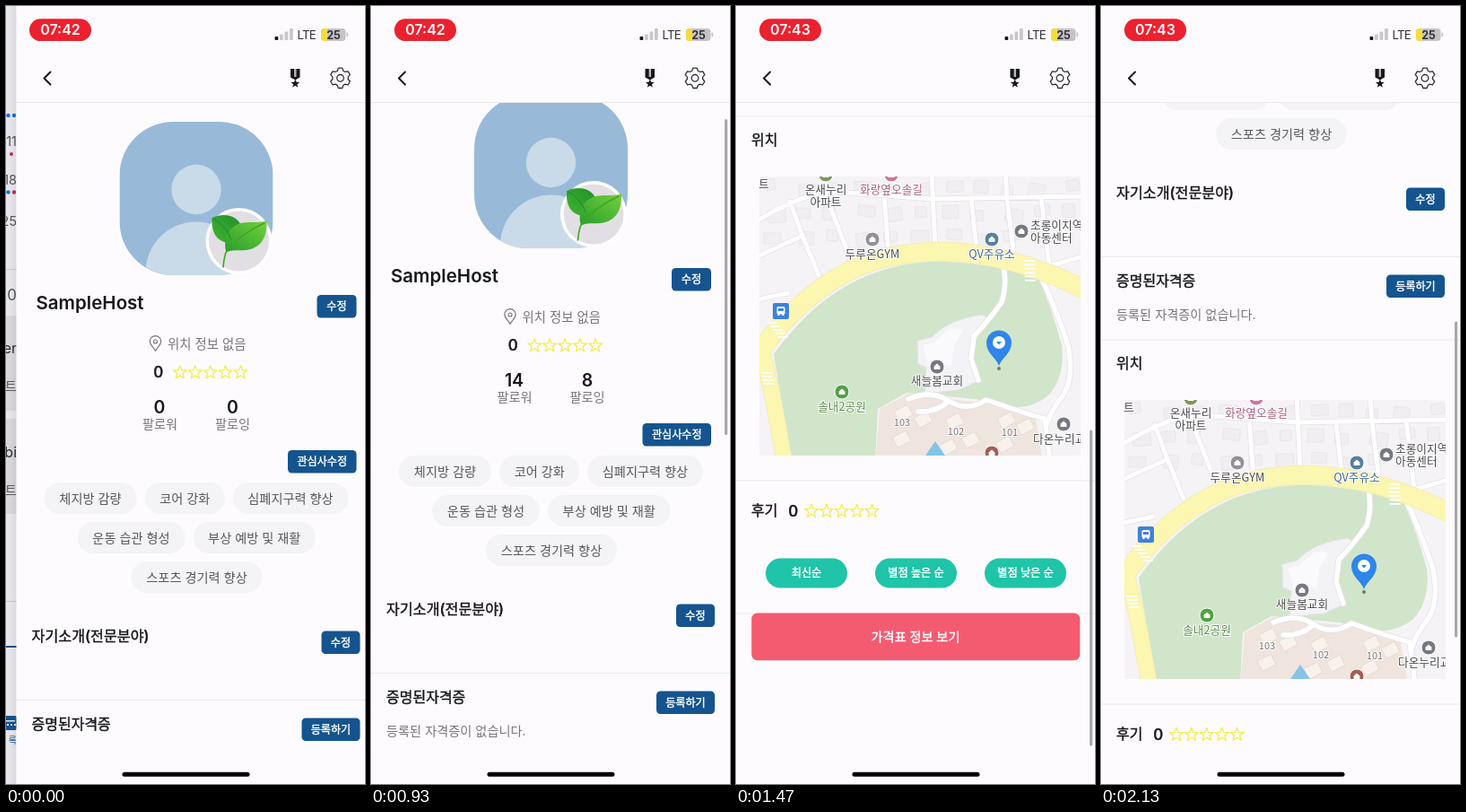
Animation, 400 px wide and 867 px high, one loop 2200 ms. Source, as an HTML page:

```html
<!DOCTYPE html>
<html lang="ko">
<head>
<meta charset="utf-8">
<title>Profile</title>
<style>
html, body { margin: 0; width: 100%; height: 100%; overflow: hidden; background: #fdfbfe; }
svg { display: block; width: 400px; height: 867px; font-family: Inter, "Noto Sans CJK KR", "Noto Sans CJK", sans-serif; }
.map text { font-family: "Noto Sans CJK KR", "Noto Sans CJK", sans-serif; paint-order: stroke; stroke: #fff; stroke-width: 2px; stroke-linejoin: round; }
</style>
</head>
<body>
<svg id="stage" viewBox="0 0 400 867"></svg>
<script>
const STEP = 1000 / 15, FRAMES = 33;
const INK = '#17171a', GRAY = '#77757b', NAVY = '#15548e';

const rect = (x, y, w, h, r, fill, more = '') =>
  `<rect x="${x}" y="${y}" width="${w}" height="${h}" rx="${r}" fill="${fill}" ${more}/>`;
const circle = (x, y, r, fill, more = '') => `<circle cx="${x}" cy="${y}" r="${r}" fill="${fill}" ${more}/>`;
const path = (d, fill, stroke = 'none', w = 1, more = '') =>
  `<path d="${d}" fill="${fill}" stroke="${stroke}" stroke-width="${w}" stroke-linecap="round" stroke-linejoin="round" ${more}/>`;
// Medium weight gets a hairline stroke, as the Korean face has only regular and bold.
const text = (s, x, y, size, fill = INK, weight = 400, anchor = 'start', more = '') =>
  `<text x="${x}" y="${y}" font-size="${size}" fill="${fill}" font-weight="${weight}" text-anchor="${anchor}" ${weight === 500 ? `stroke="${fill}" stroke-width=".4"` : ''} ${more}>${s}</text>`;
const mid = (s, x, y, size, fill, weight, more) => text(s, x, y, size, fill, weight, 'middle', more);
const line = (y, color = '#ebe9ed') => rect(0, y - .5, 400, 1, 0, color);

const polar = (cx, cy, pts) => 'M' + pts.map(([r, deg]) => {
  const a = deg * Math.PI / 180;
  return (cx + r * Math.cos(a)).toFixed(2) + ' ' + (cy + r * Math.sin(a)).toFixed(2);
}).join('L') + 'Z';
const starPath = (x, y, r) =>
  polar(x, y, Array.from({ length: 10 }, (_, i) => [i % 2 ? r * .42 : r, i * 36 - 90]));
const stars = (x, y) => [0, 1, 2, 3, 4]
  .map(i => path(starPath(x + i * 16.9, y, 7.8), 'none', '#f2ec45', 1.2)).join('');

const button = (s, x, y, w) => rect(x, y, w, 25.5, 4.5, NAVY) + mid(s, x + w / 2, y + 17.2, 12.1, '#fff', 500);
const tag = (s, x, y, w) => rect(x, y, w, 35, 17.5, '#f4f3f5') + mid(s, x + w / 2, y + 22.5, 14.2, '#59575c');
const pill = (s, x) => rect(x, 1358.6, 91, 33, 16.5, '#1fc4a9') + mid(s, x + 45.5, 1379.3, 12.2, '#fff', 500);

function statusBar() {
  const bars = [4, 6.5, 9.5, 13].map((h, i) =>
    rect(299.5 + i * 5.5, 38 - h, 3.8, h, 1, i ? '#c9c7cb' : INK)).join('');
  return rect(26, 14.3, 69, 24.8, 12.4, '#eb212f')
    + mid('07:42', 60.5, 32.4, 16, '#fff', 600, 'id="clock"') + bars
    + text('LTE', 324.5, 37, 13.2, '#333', 400, 'start', 'letter-spacing="-.7"')
    + rect(351, 25, 27.5, 14, 4, '#c5c3c7') + path('M358 25h-3a4 4 0 0 0-4 4v6a4 4 0 0 0 4 4h3z', '#f6dc3b')
    + rect(379.5, 29.5, 1.6, 5, .8, '#c5c3c7') + mid('25', 365, 36.6, 12.5, '#333', 700);
}

function header() {
  const teeth = [];
  for (let a = -90; a < 270; a += 60) teeth.push([8.7, a - 22], [11.4, a - 11], [11.4, a + 11], [8.7, a + 22]);
  return path('M38 73.5l-7 7 7 7', 'none', INK, 2)
    + path('M305.5 70h10.5v9.5l-5.2 3-5.3-3z', INK) + rect(309.6, 70, 2.4, 9, 0, '#b9b7bb')
    + path(starPath(310.8, 86.6, 5.2), INK)
    + path(polar(361, 80.3, teeth), 'none', '#303034', 1.3) + circle(361, 80.3, 3.8, 'none', 'stroke="#303034" stroke-width="1.3"')
    + line(107.5);
}

function avatar() {
  return `<g clip-path="url(#face)">${rect(115, 129, 171, 171, 0, '#98bad8')}${circle(200.5, 204.5, 27.7, '#c9dbe8')}${circle(200.5, 297, 56.5, '#c9dbe8')}</g>`
    + circle(248, 262, 37, '#fff') + circle(248, 262, 33.5, '#e2dfe4')
    + path('M218 236C229 231 243 232 249 242C253 252 247 262 236 264C222 262 217 251 218 236Z', 'url(#leafA)')
    + path('M279 239C280 257 273 270 256 272C247 273 239 271 234 275C230 262 235 248 247 243C258 239 270 243 279 239Z', 'url(#leafB)')
    + path('M276 242C261 249 239 263 233 276Q231 284 230.5 291', 'none', '#3fa52b', 1.6)
    + path('M220 237Q235 246 239 260', 'none', '#1b8a2c', 1);
}

function townMap() {
  const main = 'M20 368C48 322 93 278 150 257C220 236 300 243 392 290';
  const side = 'M30 362C40 395 46 437 54 480';
  const lanes = 'M20 214Q52 192 98 178L218 187L390 184M98 178L128 255M218 155L222 243M300 155L302 187L309 244M26 250L74 228L60 190M74 228L92 272M165 183L170 248M262 186L268 243M340 185L349 262M20 300L58 292M390 250L349 262';
  const yard = 'M298 262Q302 283 296 302Q282 322 265 340L262 365L270 389M338 270Q356 307 370 350Q377 385 365 405Q350 424 347 437M192 410Q218 399 237 412Q257 425 279 411Q319 425 344 432L350 480M237 412Q224 425 203 424';
  const street = (d, w) => path(d, 'none', '#e3e0e4', w + 1.4) + path(d, 'none', '#fff', w);
  let houses = '';
  for (let i = 0; i < 32; i++) {
    const x = 30 + (i % 11) * 33 + (i * 7) % 9, y = 166 + Math.floor(i / 11) * 27 + (i * 5) % 7;
    houses += rect(x, y, 13 + (i * 5) % 8, 12 + (i * 3) % 6, 1, '#f1eef1', `stroke="#e6e3e7" stroke-width=".7" transform="rotate(${(i % 5) * 4 - 8} ${x} ${y})"`);
  }
  const blocks = [[176, 424], [198, 431], [174, 453], [233, 433], [251, 454], [226, 462], [291, 432], [312, 439], [289, 459]]
    .map(([x, y]) => rect(x, y, 17, 13, 2, '#f8f1ec', `stroke="#e5d9d0" stroke-width=".8" transform="rotate(-28 ${x} ${y})"`)).join('');
  const poi = (x, y, c = '#777982') => circle(x, y, 8, c, 'stroke="#fff" stroke-width="1"')
    + path(`M${x - 3.4} ${y + 3}v-3.5l3.4-3 3.4 3v3.5z`, '#fff');
  const label = (s, x, y, c = '#49484c') => mid(s, x, y, 12.7, c);
  const walk = (x, y, n, dx, dy, w) => Array.from({ length: n }, (_, i) =>
    rect(x + i * dx, y + i * dy, w, 1.8, 0, '#fff')).join('');
  return `<g class="map" transform="translate(0 771)" clip-path="url(#mapBox)">`
    + rect(26, 162, 358, 311, 0, '#f6f3f6') + houses + street(lanes, 5)
    + path('M42 360C85 302 135 263 214 257Q267 255 336 274Q351 305 363 350Q367 383 349 405Q330 422 300 419L266 410L190 403L158 421L155 480H62Z', '#d1e5ca')
    + path('M202 345L218 341Q237 321 274 316L284 321L266 340L260 362L270 390L248 400L210 404L212 375L203 371Z', '#f3f2f5', '#e4e2e7')
    + path('M208 350L220 347L238 331L254 332L243 350L240 373L226 370L218 385Z', '#faf9fb')
    + path('M160 421L192 404L237 410L278 414L334 432L342 480H155Z', '#efe5de')
    + blocks + street(yard, 5.5)
    + path(side, 'none', '#f0e9bd', 18.5) + path(main, 'none', '#f0e9bd', 22)
    + path(side, 'none', '#fbf6b0', 17) + path(main, 'none', '#fbf6b0', 20.5)
    + walk(321, 255, 6, .2, 4.4, 12) + walk(35, 324, 5, 3, 4, 11) + walk(28, 380, 4, 1, 4, 12)
    + path('M211 473L222 457L233 473Z', '#85c4e5')
    + poi(100, 160, '#80985c') + poi(173, 160, '#cd7799') + poi(152, 232, '#929198') + poi(285, 232, '#587f9f')
    + poi(318, 223) + poi(224, 374) + poi(365, 438) + poi(285, 470, '#a55e55') + poi(118, 402, '#54a046')
    + rect(41, 303, 18, 18, 2, '#3e82dc') + rect(45.5, 307, 9, 8.5, 1.5, '#fff') + rect(47, 309, 6, 3, 0, '#3e82dc')
    + rect(46.5, 315, 2, 2, 0, '#fff') + rect(51.5, 315, 2, 2, 0, '#fff')
    + label('트', 31, 175) + label('온새누리', 100, 181) + label('아파트', 100, 194.5)
    + label('화랑옆오솔길', 173, 181, '#a85f84') + label('두루온GYM', 152, 253) + label('QV주유소', 285, 253, '#3f6b91')
    + text('초롱이지역', 328, 221, 12.7, '#49484c') + text('아동센터', 328, 235, 12.7, '#49484c')
    + label('새늘봄교회', 224, 394) + label('솔내2공원', 118, 423, '#5b8b4b') + text('다온누리교', 331, 459, 12.7, '#49484c')
    + mid('103', 185, 440, 11, '#77747a') + mid('102', 245, 449.5, 11, '#77747a') + mid('101', 305, 451, 11, '#77747a')
    + circle(293, 376, 2, '#6a7f76') + path('M293 373C290 364 279 359 279 347.5A14 14 0 0 1 307 347.5C307 359 296 364 293 373Z', '#2f85ea')
    + circle(293, 347, 7, '#fff') + path('M290 346h6l-3 3.5z', '#2f85ea') + '</g>';
}

function content() {
  return avatar()
    + text('SampleHost', 22, 338, 20.5, INK, 600)
    + button('수정', 335, 322, 44)
    + path('M155 384.5C153 380 148.8 378 148.8 373.8A6.2 6.2 0 0 1 161.2 373.8C161.2 378 157 380 155 384.5Z', 'none', GRAY, 1.2)
    + circle(155, 374, 2, 'none', `stroke="${GRAY}" stroke-width="1.1"`)
    + text('위치 정보 없음', 168.5, 381.5, 14.4, GRAY)
    + mid('0', 158.3, 414.2, 17, INK, 500) + stars(182.3, 408.5)
    + mid('0', 159.5, 454.3, 19.5, INK, 600, 'id="followers"') + mid('0', 241, 454.3, 19.5, INK, 600, 'id="following"')
    + mid('팔로워', 160, 471.3, 14.2, GRAY) + mid('팔로잉', 241, 471.3, 14.2, GRAY)
    + button('관심사수정', 302.5, 495, 76.5)
    + tag('체지방 감량', 31, 531, 103) + tag('코어 강화', 143, 531, 89.5) + tag('심폐지구력 향상', 241, 531, 129)
    + tag('운동 습관 형성', 68, 575, 120) + tag('부상 예방 및 재활', 197, 575, 136.5)
    + tag('스포츠 경기력 향상', 128, 619, 146)
    + text('자기소개(전문분야)', 17, 708, 16.2, INK, 500) + button('수정', 340, 696.5, 43)
    + line(773.5)
    + text('증명된자격증', 17, 805.5, 16, INK, 500) + button('등록하기', 318, 793.5, 65)
    + text('등록된 자격증이 없습니다.', 17, 843.2, 14.2, GRAY)
    + line(866) + text('위치', 17, 897.8, 16, INK, 500) + townMap()
    + line(1272) + text('후기', 17, 1311, 16, INK, 500) + mid('0', 63.7, 1311.5, 17, INK, 500) + stars(84, 1306)
    + pill('최신순', 33) + pill('별점 높은 순', 155) + pill('별점 낮은 순', 277)
    + line(1420) + rect(17.3, 1419.6, 366, 52.6, 6.5, '#f45b70') + mid('가격표 정보 보기', 200, 1451, 14.2, '#fff', 500);
}

// Strip of the dimmed screen left behind the sliding page.
function backScreen() {
  const end = (s, y, size, c = '#55535a') => text(s, 12, y, size, c, 400, 'end');
  return rect(0, 0, 30, 867, 0, '#e8e6ea')
    + circle(2.5, 122, 2.2, '#1d6fd0') + circle(9, 122, 2.2, '#1d6fd0')
    + end('11', 156, 14.5) + circle(6, 165, 2, '#c8285c')
    + end('18', 199, 14.5) + circle(2.5, 207.5, 2.2, '#1d6fd0') + circle(9, 207.5, 2.2, '#c8285c')
    + end('25', 245, 14.5) + rect(0, 293, 30, 1, 0, '#c9c7cc') + end('20', 328, 17)
    + rect(0, 345, 30, 106, 0, '#dad7dc') + end('er', 387, 16, '#29282c') + end('트', 429, 14)
    + rect(0, 460, 30, 106, 0, '#dad7dc') + end('bi', 503, 16, '#29282c') + end('트', 545, 14)
    + rect(0, 663, 30, 1, 0, '#c9c7cc') + rect(0, 713, 30, 2, 0, NAVY)
    + rect(-4, 791, 16, 16, 2, NAVY) + rect(0, 796, 10, 1.5, 0, '#e8e6ea')
    + [1, 5, 9].map(x => rect(x, 800, 2, 2, 0, '#e8e6ea')).join('') + end('록', 822, 10, NAVY);
}

const leaf = (id, a, b) => `<linearGradient id="${id}" x1="1" y1="0" x2="0" y2="1"><stop stop-color="${a}"/><stop offset="1" stop-color="${b}"/></linearGradient>`;
document.getElementById('stage').innerHTML = `<defs>
  <clipPath id="view">${rect(0, 108, 400, 723, 0, '#000')}</clipPath>
  <clipPath id="face">${rect(115, 129, 171, 171, 60, '#000')}</clipPath>
  <clipPath id="mapBox">${rect(26, 162, 358, 311, 0, '#000')}</clipPath>
  ${leaf('leafA', '#1f8f2a', '#42b532')}${leaf('leafB', '#75d13b', '#269d2b')}
  <linearGradient id="shade"><stop stop-color="#000" stop-opacity="0"/><stop offset="1" stop-color="#000" stop-opacity=".06"/></linearGradient>
  </defs>${backScreen()}
  <g id="page">${rect(-8, 0, 8, 867, 0, 'url(#shade)')}${rect(0, 0, 400, 867, 0, '#fdfbfe')}${header()}
  <g clip-path="url(#view)"><g id="content">${content()}</g></g></g>
  ${rect(394, 126, 3.2, 352, 1.6, '#a9a7ac', 'id="bar"')}${statusBar()}${rect(129.5, 853.7, 142, 5, 2.5, '#000')}`;

const el = Object.fromEntries(['page', 'content', 'bar', 'clock', 'followers', 'following']
  .map(id => [id, document.getElementById(id)]));

// Scroll offsets per step, starting at the step where the drag begins.
const DRAG = 13;
const SCROLL = [7, 30, 92, 195, 320, 445, 552, 637, 702, 743, 764, 771, 769, 763, 756, 751, 736, 688, 600, 494];

function draw(k) {
  const slide = k < 8 ? 11.5 * (1 - k / 8) ** 2.2 : 0;
  const y = k < DRAG ? 0 : SCROLL[k - DRAG];
  el.page.setAttribute('transform', `translate(${slide.toFixed(2)} 0)`);
  el.content.setAttribute('transform', `translate(0 ${-y})`);
  const top = 111.4 + .486 * Math.min(y, 751) + Math.max(0, y - 751);
  el.bar.setAttribute('y', top);
  el.bar.setAttribute('height', Math.min(352, 828 - top));
  el.bar.setAttribute('visibility', k < DRAG ? 'hidden' : 'visible');
  el.clock.textContent = k < 22 ? '07:42' : '07:43';
  el.followers.textContent = k < 5 ? '0' : '14';
  el.following.textContent = k < 5 ? '0' : '8';
}

const start = performance.now();
function tick() {
  const t = (performance.now() - start) % (STEP * FRAMES);
  draw(Math.min(FRAMES - 1, Math.floor((t + 3.5) / STEP)));
  requestAnimationFrame(tick);
}
tick();
</script>
</body>
</html>
```
